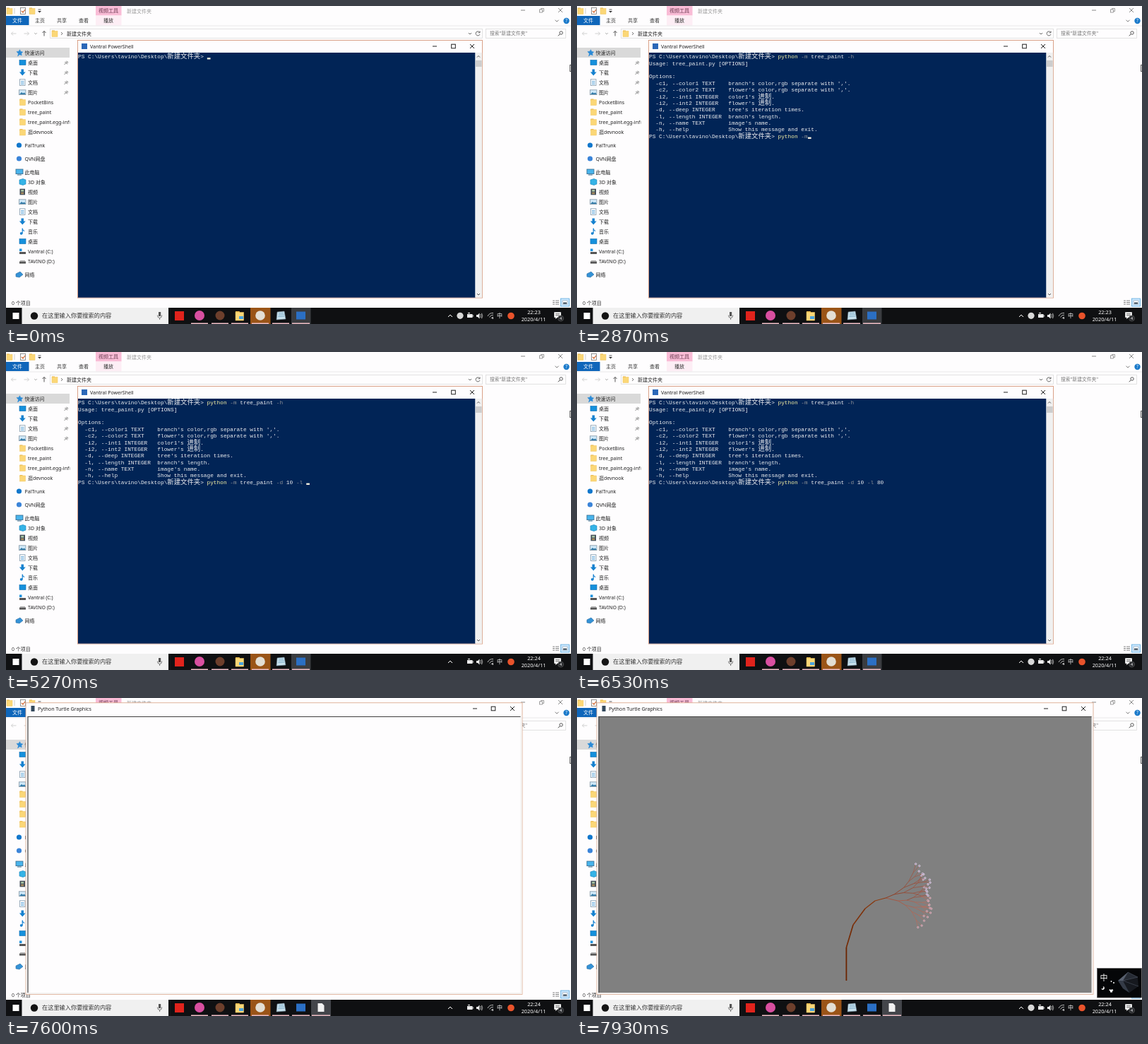
These frames come from a looping animation (800x450 px, 8 s). An HTML page:

```html
<!DOCTYPE html>
<html lang="zh-CN">
<head>
<meta charset="utf-8">
<title>tree_paint</title>
<style>
html, body { margin: 0; width: 100%; height: 100%; overflow: hidden; background: #fefefe; }
svg { display: block; width: 800px; height: 450px; }
text { font-family: 'Noto Sans', 'Noto Sans CJK SC', sans-serif; white-space: pre; }
.mono { font-family: 'Liberation Mono', 'Noto Sans CJK SC', monospace; font-weight: 300; }
</style>
</head>
<body>
<svg viewBox="0 0 800 450">
  <defs>
    <clipPath id="side"><rect x="0" y="50" width="90.5" height="360"/></clipPath>
  </defs>
  <g id="base"></g>
  <g id="live"></g>
</svg>
<script>
const LOOP = 8000;
const CELL = 4.68, ROW = 9.37;
const WHITE = '#fefdfe';

// Drawing helpers, each returns markup
const rect = (x, y, w, h, fill, line = 'none', lw = 0.8) =>
  `<rect x="${x}" y="${y}" width="${w}" height="${h}" fill="${fill}" stroke="${line}" stroke-width="${lw}"/>`;
const dot = (x, y, r, fill, line = 'none', lw = 0.8) =>
  `<circle cx="${x}" cy="${y}" r="${r}" fill="${fill}" stroke="${line}" stroke-width="${lw}"/>`;
const path = (d, line, lw = 1, fill = 'none') =>
  `<path d="${d}" stroke="${line}" stroke-width="${lw}" fill="${fill}"/>`;
const text = (x, mid, s, fill = '#222', size = 7, anchor = 'start') =>
  `<text x="${x}" y="${mid + size * 0.36}" font-size="${size}" fill="${fill}" text-anchor="${anchor}">${s}</text>`;

const folder = (x, y, k = 1) =>
  rect(x, y - 4.5 * k, 4 * k, 3 * k, '#e9b84a') + rect(x, y - 3.5 * k, 8 * k, 8 * k, '#fbd777', '#f0c45c', 0.5);
const closer = (x, y, color) => path(`M${x - 3} ${y - 3}l6 6m0 -6l-6 6`, color);
const controls = ([a, b, c], y, color) =>
  path(`M${a - 3} ${y}h6`, color) + rect(b - 2.8, y - 2.8, 5.6, 5.6, 'none', color, 1) + closer(c, y, color);
const chevron = (x, y, up, color, s = 2.5) =>
  path(`M${x - s} ${y + (up ? s / 2 : -s / 2)}l${s} ${up ? -s : s}l${s} ${up ? s : -s}`, color);
const arrow = (x, y, dx, dy, color) =>
  path(`M${x - 3.5 * dx} ${y - 3.5 * dy}L${x + 3.5 * dx} ${y + 3.5 * dy}m${-2.5 * dx - 2.5 * dy} ${-2.5 * dy - 2.5 * dx}` +
    `l${2.5 * dx + 2.5 * dy} ${2.5 * dy + 2.5 * dx}l${-2.5 * dx + 2.5 * dy} ${-2.5 * dy + 2.5 * dx}`, color);

const glyph = {
  pinned: y => path(`M15 ${y - 1.5}l3 -.3l1.500 -2.500l1.3 2.700l3 .6l-2 2l.4 3l-2.700 -1.300l-3 2.300l1 -3.500z`, '#2b8ad6', 0.5, '#2b8ad6'),
  desk: y => rect(19, y - 3.5, 9, 7, '#1590dc', '#0b6cb0', 0.6),
  down: y => path(`M21.5 ${y - 4.5}h3.5v4h2.7l-4.4 5l-4.4 -5h2.6z`, 'none', 0, '#1481cf'),
  doc: y => rect(19.5, y - 4.2, 7.5, 8.6, '#fff', '#7d96aa', 0.8) + path(`M21 ${y - 1.5}h4.5m-4.5 2h4.5m-4.5 2h4.5`, '#58a3d8', 0.9),
  pic: y => rect(18.5, y - 3.2, 9.5, 6.8, '#cfe8f8', '#8396a5', 0.8) + path(`M19 ${y + 3}l3 -3l2 1.5l2 -1l2 2.5z`, 'none', 0, '#337ba8'),
  folder: y => folder(19.5, y),
  blob: y => dot(18.5, y, 3.6, '#1177cc'),
  blob2: y => dot(18.5, y, 3.6, '#3b84d8'),
  pc: y => rect(14, y - 4, 10, 6.6, '#49b4ec', '#33688c', 0.8) + path(`M16 ${y + 4}h6`, '#33688c', 1.2),
  cube: y => path(`M19 ${y - 3}l5 -1.5l4 1.5v6l-4 1.5l-5 -1.5z`, '#1384bc', 0.6, '#35b3e6'),
  film: y => rect(19.5, y - 4.3, 7.5, 8.6, '#414c58') + rect(21.2, y - 3, 4, 2.6, '#a9c4a2') + rect(21.2, y + 0.6, 4, 2.6, '#a98d5f'),
  note: y => dot(21.7, y + 2.8, 1.9, '#1983d0') + path(`M23.2 ${y + 3}v-7.5q0 3 3 4`, '#1983d0', 1.2),
  disk: y => rect(19, y, 9, 3, '#555') + path(`M20 ${y - 1}h7`, '#aaa', 1),
  sysdisk: y => rect(19, y + 0.5, 9, 3, '#555') + rect(19, y - 4, 3.5, 3.5, '#1c91dc'),
  net: y => path(`M14 ${y - 1}l6 -3l4 4l-5 4l-5 -1z`, '#2a6ca2', 0.6, '#3492d6')
};

// [middle, icon, label]; child rows are indented
const SIDE = [
  [66, 'pinned', '快速访问'], [80, 'desk', '桌面'], [94, 'down', '下载'], [108, 'doc', '文档'], [122, 'pic', '图片'],
  [136, 'folder', 'PocketBins'], [150, 'folder', 'tree_paint'], [164, 'folder', 'tree_paint.egg-info'], [178.5, 'folder', '逛devnook'],
  [197, 'blob', 'PalTrunk'], [216, 'blob2', 'QVN网盘'], [235, 'pc', '此电脑'], [249, 'cube', '3D 对象'], [263, 'film', '视频'],
  [277, 'pic', '图片'], [291, 'doc', '文档'], [305, 'down', '下载'], [319, 'note', '音乐'], [333, 'desk', '桌面'],
  [347.5, 'sysdisk', 'Vantral (C:)'], [361.5, 'disk', 'TAVINO (D:)'], [380, 'net', '网络']
];
const ROOTS = ['pinned', 'blob', 'blob2', 'pc', 'net'];

function explorer() {
  let s = rect(0, 0, 800, 427, WHITE);
  s += rect(127, 0, 36.5, 13.5, '#f9bcd6') + rect(127, 13.5, 36.5, 14, '#fdeef5');
  s += folder(1, 7) + path('M12 3v8', '#bbb', 0.7) + rect(20.5, 2.5, 7, 9, '#fff', '#777') + path('M22 7l2 2l3 -4', '#d1642b', 1.2);
  s += folder(33, 7) + path('M45.5 5h4', '#333', 0.8) + path('M45 7h5l-2.5 2.5z', 'none', 0, '#333');
  s += text(131, 6, '视频工具', '#6b3c52') + text(171, 7, '新建文件夹', '#999');
  s += path('M729 6h6', '#888') + path('M757.500 5v-1.500h4v4h-1.500', '#888', 0.8) + rect(755.500, 5, 4, 4, 'none', '#888') + closer(785, 6, '#888');
  s += rect(0, 14, 32.5, 13, '#0f66ba');
  ['文件', '主页', '共享', '查看', '播放'].forEach((w, i) => s += text([9, 41, 72, 103, 138][i], 20.5, w, i ? '#333' : '#fff'));
  s += chevron(780, 21, false, '#777') + dot(793.5, 21, 4.2, '#1979ca') + text(793.5, 21, '?', '#fff', 6.5, 'middle');
  s += path('M0 28h800', '#e2e2e2', 0.8);
  s += arrow(11, 39, -1, 0, '#d0d0d0') + arrow(29, 39, 1, 0, '#d0d0d0') + chevron(42, 39, false, '#aaa', 1.8) + arrow(54, 39, 0, -1, '#555');
  s += rect(62.5, 32.5, 612, 13, WHITE, '#dcdcdc') + folder(65, 39) + path('M78 37l2 2l-2 2', '#555', 0.8) + text(86, 39, '新建文件夹');
  s += chevron(657, 39, false, '#666', 2) + path('M670.5 37a3 3 0 1 0 .5 3m0 -4.5v2.3h-2.3', '#555', 0.9);
  s += rect(679.5, 32.5, 113, 13, WHITE, '#dcdcdc') + text(685, 39, '搜索"新建文件夹"', '#777', 6.8);
  s += dot(786, 38, 2.2, 'none', '#444', 0.9) + path('M784.4 39.7l-2.6 2.6', '#444', 1);
  s += rect(798.6, 83.5, 4, 9, '#eee', '#555', 1);
  s += rect(0, 59, 90, 14, '#d9d9d9') + '<g clip-path="url(#side)">';
  SIDE.forEach(([y, icon, label], i) => {
    s += glyph[icon](y) + text(ROOTS.includes(icon) ? 26.5 : 31, y, label);
    if (i > 0 && i < 5) s += path(`M82.5 ${y + 3}l2.5 -2.5m-1.7 -1.5l3.4 3.4m-2 -3.8l2.6 2.6m-1.5 -3.4l2.4 2.4`, '#777', 0.9);
  });
  s += '</g>' + text(8, 420, '0 个项目', '#333');
  s += path('M774 417h3m1 0h5m-9 2.5h3m1 0h5m-9 2.5h3m1 0h5', '#777', 0.9);
  return s + rect(785.5, 414, 12, 11, '#cce8ff', '#5ba9dd') + rect(788, 417, 7, 5, '#fff', '#89a', 0.6) + rect(789, 419.5, 5, 2, '#345');
}

function consoleFrame() {
  let s = rect(101.5, 48.5, 573, 364.5, WHITE, '#d28a6c');
  s += rect(102, 66, 562.5, 346.6, '#012456') + rect(664.5, 66, 9.7, 346.6, '#f0f0f0') + rect(665, 77, 8.6, 9, '#cdcdcd');
  return s + chevron(669, 71.5, true, '#555', 2) + chevron(669, 408, false, '#555', 2);
}

function taskbar() {
  let s = rect(0, 427, 800, 23, '#0f1012') + rect(22.5, 427, 207.5, 23, '#f0f0f0');
  s += rect(9.5, 434, 9, 9, '#fff') + dot(40, 438.5, 5.2, '#141414') + text(51, 438.5, '在这里输入你要搜索的内容', '#333', 8.2);
  s += rect(216, 433, 3.2, 6, '#555') + path('M214.5 437.5q0 4 3.1 4t3.1 -4m-3.1 4v2.5', '#555', 0.8);
  s += rect(239, 432, 13, 13, '#e0231c') + dot(274, 438, 7, '#d94fa0') + dot(303, 438, 6.5, '#6d3f2c');
  s += folder(325, 438.5, 1.45) + rect(330, 439, 6, 4, '#4aa3dd');
  s += rect(346, 427, 28.5, 23, '#9a5417') + dot(360, 438, 6.8, '#e3ded4');
  s += path('M384 433l10 -1l2 11l-13 1z', '#6d8796', 0.6, '#c9e2ee') + path('M386 435l7 -.7m-7.3 3l8 -.7m-8.4 3l9 -.7', '#6c9fbd', 0.8);
  s += path('M262 449.2h24m5 0h24m4 0h24m5 0h24m5 0h24', '#f0bfc7', 1.5);
  s += chevron(629, 438.5, true, '#fff', 3) + rect(653, 436, 7.5, 5, '#eee') + rect(660.5, 437.4, 1.2, 2.2, '#eee') + path('M654 434.5h3', '#ddd', 1.3);
  s += path('M666 437h2l2.5 -2.5v8l-2.5 -2.5h-2z', 'none', 0, '#eee') + path('M672 436q1.6 2.5 0 5m1.5 -6.2q2.4 3.7 0 7.4', '#ddd', 0.8);
  s += path('M682 439a8 8 0 0 1 8 -4.5m-5.5 6a6 6 0 0 1 5.5 -3.4m-3.2 5a4 4 0 0 1 3.2 -2', '#ccc', 0.9) + dot(689.2, 441.8, 0.9, '#fff');
  s += text(699, 438.5, '中', '#fff', 8, 'middle') + dot(715, 438.5, 4.8, '#e9532b');
  s += text(747, 443.5, '2020/4/11', '#fff', 7.3, 'middle');
  s += path('M776.5 433.5h9v7h-5l-2 2v-2h-2z', '#fff', 0.6, '#fff') + path('M778 435.7h6m-6 2.2h6', '#222', 0.7);
  return s + dot(785.5, 442, 4, '#26282b', '#777', 0.5) + text(785.5, 442, '4', '#fff', 6, 'middle');
}

// Console text on a fixed cell grid
function cells(col, row, s, fill = '#eeedf0') {
  let out = '';
  for (const run of s.match(/[\u4e00-\u9fff]+|[^\u4e00-\u9fff]+/g) || []) {
    const wide = run.charCodeAt(0) > 0x4dff;
    const lead = run.length - run.trimStart().length;
    out += `<text class="mono" x="${102 + (col + lead) * CELL}" y="${74.3 + row * ROW}" font-size="${wide ? CELL * 2 : CELL / 0.6}" fill="${fill}">${run.trimStart().replace(/>/g, '&gt;')}</text>`;
    col += run.length * (wide ? 2 : 1);
  }
  return out;
}
const PROMPT = 'PS C:\\Users\\tavino\\Desktop\\新建文件夹> ';
const START = 39;
function command(row, s) {
  let out = cells(0, row, PROMPT);
  for (const m of s.matchAll(/\S+/g)) {
    const fill = m.index === 0 ? '#f9f1a5' : m[0][0] === '-' ? '#8d9097' : '#eeedf0';
    out += cells(START + m.index, row, m[0], fill);
  }
  return out;
}
const OPTIONS = [
  ['-c1, --color1 TEXT', "branch's color,rgb separate with ','."],
  ['-c2, --color2 TEXT', "flower's color,rgb separate with ','."],
  ['-i2, --int1 INTEGER', "color1's 进制."],
  ['-i2, --int2 INTEGER', "flower's 进制."],
  ['-d, --deep INTEGER', "tree's iteration times."],
  ['-l, --length INTEGER', "branch's length."],
  ['-n, --name TEXT', "image's name."],
  ['-h, --help', 'Show this message and exit.']
];
const HELP = cells(0, 1, 'Usage: tree_paint.py [OPTIONS]') + cells(0, 3, 'Options:') +
  OPTIONS.map(([a, b], i) => cells(2, 4 + i, a) + cells(24, 4 + i, b)).join('');

// Step tables: [ms, value]
const at = (steps, t) => steps.reduce((v, [ms, x]) => t >= ms ? x : v, steps[0][1]);
const flips = (times, t) => times.filter(ms => t >= ms).length % 2 === 0;

const CMD1 = 'python -m tree_paint -h';
const TYPED1 = [[0, 0], [70, 2], [130, 5], [200, 7], [265, 9], [330, 12], [400, 14], [600, 18], [665, 20], [730, 22], [1330, 23]];
const CMD2 = 'python -m tree_paint -d 10 -l ';
const TYPED2 = [[0, 0], [2600, 2], [2665, 5], [2730, 7], [2800, 9], [3265, 11], [3330, 13], [3400, 15], [3465, 17], [3530, 19],
  [3600, 20], [3665, 21], [3730, 22], [3870, 24], [3930, 27], [4000, 30]];
const TAIL = [[0, ''], [4065, '70'], [4930, '7'], [5070, ''], [5400, '8'], [5530, '80']];
const CARET = [4330, 4600, 5730, 5930, 6130, 6270, 6530, 6665, 6730];
const TRAY = [330, 665, 1000, 1400, 1800, 2130, 2465, 2800, 3065, 3400, 3730, 4065, 4400, 4665, 5065, 5400, 5730, 6065, 6270, 6465, 6730, 7065, 7595, 7930];
const ENTER1 = 1865, OUTPUT = 2265, ENTER2 = 7065, CLOCK = 3465, SMALL = 7400, BIG = 7530, GREY = 7665;
const GROWN = [[0, 0], [7730, 0.07], [7800, 0.38], [7865, 0.7], [7930, 1]];

// Tree: a bent stem, then a forked crown drawn right side first
function buildTree() {
  const parts = [], stem = [[381.4, 400], [381.4, 353], [391, 321], [408, 298], [422, 287], [437, 283]];
  const seg = (x1, y1, x2, y2, w, color) => path(`M${x1} ${y1}L${x2} ${y2}`, color, w);
  for (let i = 0; i < 5; i++) parts.push(seg(...stem[i], ...stem[i + 1], 1.8 - i * 0.15, `rgb(${108 + i * 9},${36 + i * 6},${i * 4})`));
  let seed = 7;
  const rnd = () => (seed = (seed * 16807) % 2147483647) / 2147483647;
  (function fork(x, y, angle, len, level) {
    for (const turn of [-16, 15]) {
      const a = angle + turn + (rnd() - 0.5) * 8, l = len * (0.75 + rnd() * 0.5);
      const nx = x + l * Math.cos(a * Math.PI / 180), ny = y - l * Math.sin(a * Math.PI / 180);
      const low = ny > 283;
      let s = seg(x, y, nx, ny, 1 - level * 0.08, low ? `rgb(${164 + level * 5},${88 + level * 5},${68 + level * 6})` : `rgb(${140 + level * 6},${62 + level * 6},${36 + level * 8})`);
      if (level === 4) s += dot(nx, ny, 1.2, low ? '#a4808c' : '#8c7ba0', low ? '#e4b6c0' : '#f0e0f2', 0.8);
      parts.push(s);
      if (level < 4) fork(nx, ny, a, len * 0.92, level + 1);
    }
  })(437, 283, 7, 15, 0);
  return parts;
}
const TREE = buildTree();

function smallWindow() {
  let s = rect(35, 30.5, 70, 60.5, '#f0f0f0', '#d28a6c') + rect(35.5, 31, 69, 17, WHITE);
  s += controls([40, 65, 92], 39.5, '#222') + rect(42, 36, 5, 7, '#33485c');
  s += rect(37, 50.5, 55, 28, WHITE) + path('M37.5 78.5V51H92', '#444', 1.2);
  s += rect(95, 50, 9, 28, '#f7f7f7') + rect(96, 59, 8, 10, '#c6c6c6') + chevron(99.5, 55, true, '#555', 2) + chevron(99.5, 74, false, '#555', 2);
  s += rect(36, 80, 58, 10, '#f7f7f7') + rect(59, 81, 10.5, 8.5, '#c6c6c6');
  return s + path('M42 83l-2 2l2 2M87.5 83l2 2l-2 2', '#555', 1);
}
function bigWindow(t) {
  let s = rect(28, 6.8, 703, 412.5, WHITE, '#d9a184') + rect(28.5, 24.5, 702, 394.5, '#f3f1f0');
  s += rect(35.5, 11, 5, 8, '#33485c') + text(45, 15, 'Python Turtle Graphics', '#222', 7.1) + controls([664, 690, 717], 15, '#222');
  s += rect(30.5, 26, 698, 391, t < GREY ? WHITE : '#808080') + path('M31 417V26.5H728.5', '#444', 1.2);
  return s + TREE.slice(0, Math.round(at(GROWN, t) * TREE.length)).join('');
}
function imePanel() {
  let s = rect(736.5, 382.5, 63, 41.5, '#050608', '#555', 0.6) + text(746, 396, '中', '#fff', 11, 'middle');
  s += dot(744.5, 410.5, 2.4, '#fff') + dot(743.3, 409.5, 2, '#050608') + dot(756.5, 401, 0.9, '#fff') + dot(760, 403, 1, '#fff');
  s += path('M754 412l2 1l2 -1l1.5 2l-1.5 .5v2h-3v-2l-1.5 -.5z', 'none', 0, '#fff');
  s += path('M780 388l14 7l1 13l-13 9l-9 -6l-7 -11z', 'none', 0, '#16191f');
  return s + path('M780 388l-7 12l-7 0z', 'none', 0, '#596170') + path('M773 400l9 17l-9 -6l-7 -11z', 'none', 0, '#343b47') +
    path('M780 388l14 7l-21 5zM773 400l22 8', '#596170', 0.5, '#262b34');
}

function scene(t) {
  const back = t >= SMALL;
  const ink = back ? '#999' : '#222';
  let s = rect(107, 53, 8, 8, '#2b68b8') + text(119, 57, 'Vantral PowerShell', ink) + controls([607, 633.5, 660], 57, ink);

  const first = CMD1.slice(0, at(TYPED1, t));
  s += command(0, first);
  let col = START + first.length, row = 0;
  if (t >= ENTER1) { col = 0; row = 1; }
  if (t >= OUTPUT) {
    const line = CMD2.slice(0, at(TYPED2, t)) + at(TAIL, t);
    s += HELP + command(12, line);
    col = START + line.length; row = 12;
  }
  if (t >= ENTER2) { col = 0; row = 13; }
  if (flips(CARET, t)) s += rect(102.3 + col * CELL, 73.2 + row * ROW, CELL, 2.3, '#f8f3e0');

  const lit = t < BIG;
  s += rect(404, 427, 27.5, 23, back ? '#0f1012' : '#3a3c40') + rect(411, 432.5, 13, 11, '#2b6fc4') + path('M405 449.2h25', '#f0bfc7', 1.5);
  if (back) {
    s += rect(432, 427, 28, 23, lit ? '#2a2b2e' : '#43454a') + path('M441.5 432h6l3 3v9h-9z', 'none', 0, lit ? '#b5b5b5' : '#f2f2f2');
    s += path('M433 449.2h26', '#f0bfc7', 1.5);
  }
  if (flips(TRAY, t)) s += dot(643, 438.3, 4.6, '#d8d8d8');
  s += text(747.5, 433, t < CLOCK ? '22:23' : '22:24', '#fff', 7.3, 'middle');

  if (t >= BIG) s += bigWindow(t);
  else if (back) s += smallWindow();
  if (t >= 7930) s += imePanel();
  return s;
}

document.getElementById('base').innerHTML = explorer() + consoleFrame() + taskbar();
const live = document.getElementById('live');
const begin = performance.now();
let shown = '';
function tick() {
  const next = scene((performance.now() - begin) % LOOP);
  if (next !== shown) live.innerHTML = shown = next;
  requestAnimationFrame(tick);
}
tick();
</script>
</body>
</html>
```
